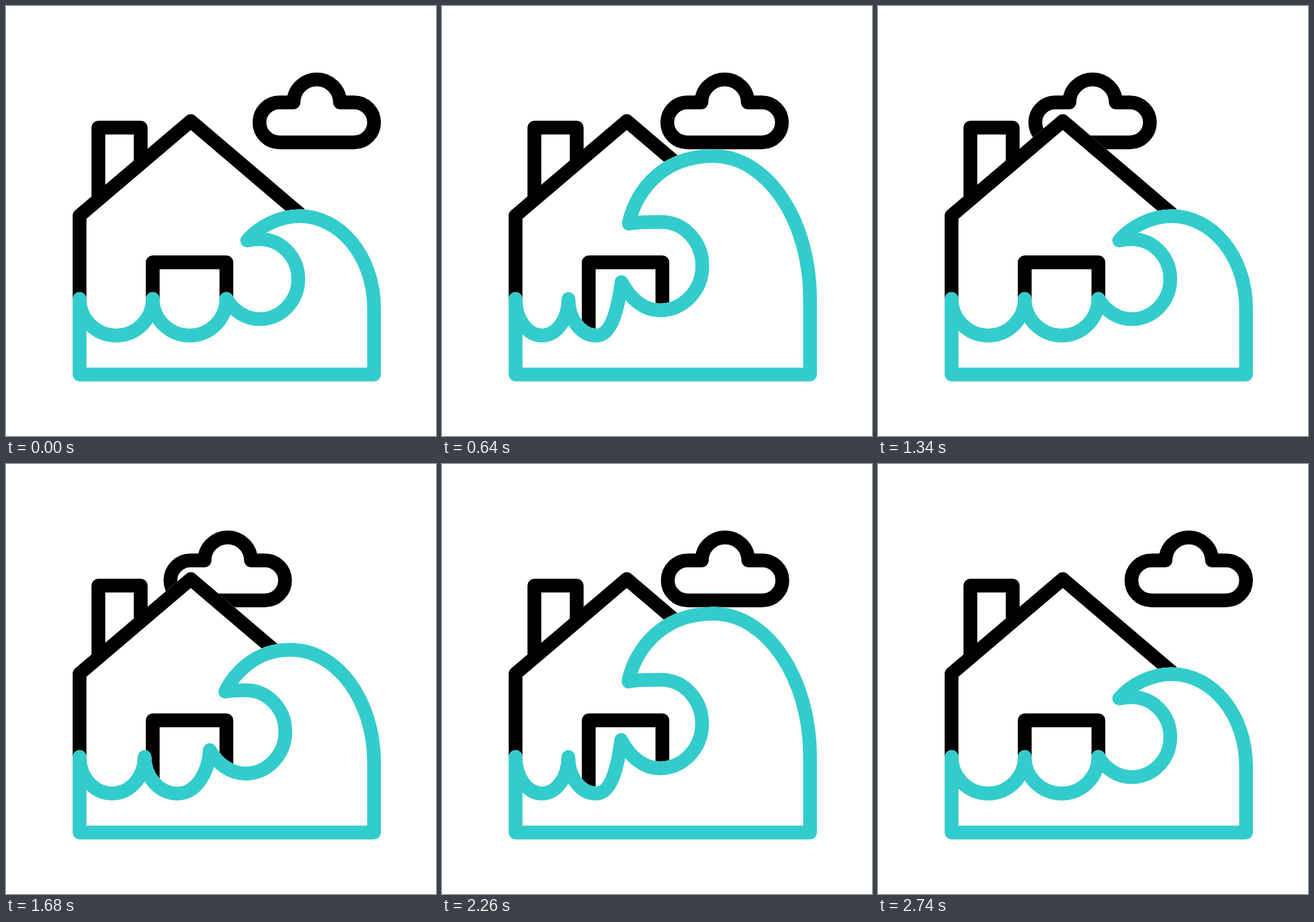
An HTML page with a canvas for the animation above (2.92 s loop, 640 by 640 pixels).

```html
<!DOCTYPE html>
<html lang="en">
<head>
<meta charset="utf-8">
<title>House and wave</title>
<style>
  html, body { margin: 0; height: 100%; overflow: hidden; background: #fff; }
  canvas { display: block; }
</style>
</head>
<body>
<canvas id="stage" width="640" height="640"></canvas>
<script>
const ctx = document.getElementById('stage').getContext('2d');
const LOOP = 2920, STEP = 20, START = 200;
const BLACK = '#000', TEAL = '#33cccc';

const cloud = new Path2D('M428 143.5H407A29.8 29.8 0 0 0 407 203.1H518A29.8 29.8 0 0 0 518 143.5H497A34.5 34.2 0 0 0 428 143.5Z');
const chimney = new Path2D('M137.5 289V181H200.5V235');
const house = new Path2D('M109.5 436V312L275 171.3L438 310');
const door = new Path2D('M218.4 490V381.5H328V450');

const smooth = u => {
  u = Math.min(1, Math.max(0, u));
  return u * u * (3 - 2 * u);
};

// Eases from 0 up to 1 at peak and back to 0 at end.
const swing = (t, start, peak, end) =>
  t < peak ? smooth((t - start) / (peak - start)) : smooth((end - t) / (end - peak));

// Wave outline: k = 0 is calm, larger values rise and lean left.
function wavePath(k) {
  const path = new Path2D();
  const mix = (calm, high) => calm + (high - calm) * k;
  let x, y;
  const curve = (a, b, c, d, endX, endY) => {
    path.bezierCurveTo(a, b, c, d, endX, endY);
    x = endX;
    y = endY;
  };
  const K = 0.5523;
  // Quarter ellipses, named by the direction in which they set off.
  const fromVertical = (ex, ey) => curve(x, y + (ey - y) * K, ex - (ex - x) * K, ey, ex, ey);
  const fromHorizontal = (ex, ey) => curve(x + (ex - x) * K, y, ex, ey - (ey - y) * K, ex, ey);

  x = 547.8;
  y = mix(450, 436);
  path.moveTo(x, y);
  fromVertical(mix(437.5, 404), mix(312.8, 223.5));
  curve(mix(405, 318), y, mix(376, 284), mix(329, 290), mix(359, 278.3), mix(349, 324));
  curve(mix(365, 292), mix(347.5, 321), mix(371, 310), mix(347, 321.5), mix(377.5, 327), mix(347, 321.5));
  fromHorizontal(mix(435, 387.5), mix(406.5, 387));
  fromVertical(mix(377.5, 324), mix(466, 453));
  curve(mix(357, 301), y, mix(338.6, 280), mix(453.8, 436), mix(328, 267.3), mix(436, 411));
  curve(mix(328, 262), mix(466, 450), mix(303.5, 253), 490.5, mix(273.4, 229.5), 490.5);
  fromHorizontal(mix(218.4, 188.3), 436);
  fromVertical(mix(164, 148.8), 490.5);
  fromHorizontal(109.5, 436);
  path.lineTo(109.5, 548.6);
  path.lineTo(547.8, 548.6);
  path.closePath();
  return path;
}

function stroke(path, color, cap = 'butt') {
  ctx.strokeStyle = color;
  ctx.lineCap = cap;
  ctx.stroke(path);
}

// Clears everything behind a shape.
function cutOut(path) {
  ctx.globalCompositeOperation = 'destination-out';
  ctx.fill(path);
  stroke(path, BLACK);
  ctx.globalCompositeOperation = 'source-over';
}

function draw(t) {
  ctx.clearRect(0, 0, 640, 640);
  ctx.lineWidth = 20.5;
  ctx.lineJoin = 'round';

  ctx.save();
  ctx.translate(-146 * swing(t, START, 1444, 2700), 0);
  stroke(cloud, BLACK);
  ctx.restore();

  cutOut(house);
  [chimney, house, door].forEach(part => stroke(part, BLACK));

  const surge = t < 1440 ? t - START : t - 1440;
  const wave = wavePath(1.36 * swing(surge, 0, 663, 1135));
  cutOut(wave);
  stroke(wave, TEAL, 'round');
}

function tick() {
  const t = performance.now() % LOOP;
  draw(Math.floor(t / STEP) * STEP);
  requestAnimationFrame(tick);
}
tick();
</script>
</body>
</html>
```
